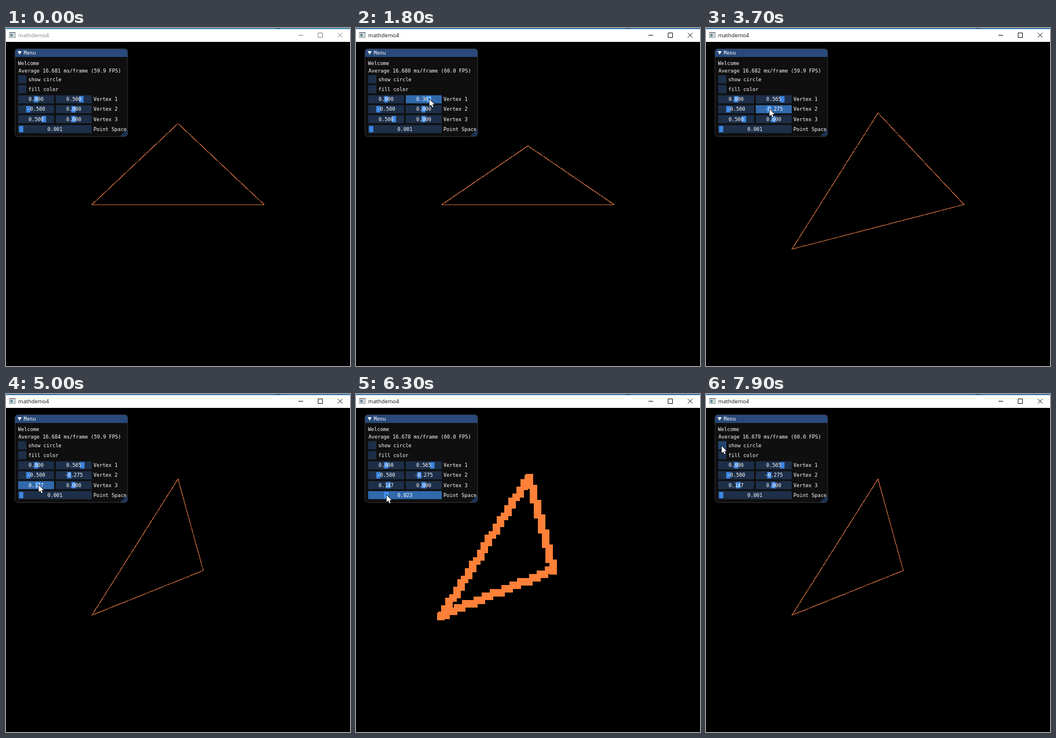
An HTML page with a canvas for the animation above (8 s loop, 594 by 584 pixels).

```html
<!DOCTYPE html>
<html lang="en">
<head>
<meta charset="utf-8">
<title>Triangle editor</title>
<style>
html, body { margin: 0; width: 100%; height: 100%; overflow: hidden; background: #000; }
canvas { display: block; }
</style>
</head>
<body>
<canvas id="stage" width="594" height="584"></canvas>
<script>
const ctx = document.getElementById('stage').getContext('2d');
const MONO = '8.67px "DejaVu Sans Mono", monospace';
const LOOP = 8000, STEP = 100, ROW = 17.15;

// The pointer rests on each stop and glides between them
const stops = [
  { from: 200, to: 200, spot: [481, 499] },
  { from: 1000, to: 2800, slider: 1 },
  { from: 3100, to: 4000, slider: 3 },
  { from: 4500, to: 5200, slider: 4 },
  { from: 5500, to: 7350, slider: 6 },
  { from: 7700, to: LOOP, spot: [27, 90] }
];

const progress = (t, from, to) => Math.min(1, Math.max(0, (t - from) / (to - from)));
const smooth = u => u * u * (3 - 2 * u);
const mix = (a, b, u) => a + (b - a) * u;

// Vertex positions (-1 to 1) as the sliders are dragged
function vertices(t) {
  const u = progress(t, 1100, 2600);
  return [
    [0, mix(.5, .565, u) - .169 * Math.sin(Math.PI * u)],
    [-.5, -.275 * progress(t, 3100, 3700)],
    [mix(.5, .147, progress(t, 4600, 5000)), 0]
  ];
}

function pointSpace(t) {
  const u = progress(t, 5500, 7180);
  return .001 + .029 * Math.sin(Math.PI * u ** 1.47) ** 2;
}

function frameTime(t) {
  const s = t / 1000;
  return 16.681 + .0008 * s * Math.sin(1.3 * (s - 3.3));
}

function layoutSliders(verts, space) {
  const list = verts.flatMap((vert, row) => vert.map((value, col) => ({
    x: 21 + 65 * col, y: 123.2 + ROW * row, w: 62, value, grab: 52 + 64.6 * col + 27 * value
  })));
  list.push({ x: 21, y: 174.7, w: 127, value: space, grab: 25 + space * 1190 });
  return list;
}

function locatePointer(t, sliders) {
  const place = stop => stop.spot || [sliders[stop.slider].grab + .5, sliders[stop.slider].y];
  const next = stops.find(stop => t < stop.to);
  const prev = stops[stops.indexOf(next) - 1] || next;
  const u = prev === next ? 1 : smooth(progress(t, prev.to, next.from));
  const [ax, ay] = place(prev), [bx, by] = place(next);
  return { x: mix(ax, bx, u), y: mix(ay, by, u), held: t >= next.from ? sliders[next.slider] : undefined };
}

function rect(x, y, w, h, color) {
  ctx.fillStyle = color;
  ctx.fillRect(x, y, w, h);
}

function text(str, x, y, color = '#fff', font = MONO, align = 'left') {
  ctx.font = font;
  ctx.textAlign = align;
  ctx.fillStyle = color;
  ctx.fillText(str, x, y);
}

function polygon(points) {
  ctx.beginPath();
  points.forEach(([x, y]) => ctx.lineTo(x, y));
  ctx.closePath();
}

// Bresenham steps of one point spacing, counted from the first vertex
function edge([ax, ay], [bx, by], space) {
  const size = Math.max(1, Math.round(space * 580));
  ctx.fillStyle = size > 1 ? '#ff8038' : '#c86a3c';
  const dx = Math.round(Math.abs(bx - ax) / space), dy = Math.round(Math.abs(by - ay) / space);
  const sx = Math.sign(bx - ax), sy = Math.sign(by - ay);
  let x = 0, y = 0, err = dx - dy;
  for (;;) {
    const px = 297 + (ax + sx * x * space) * 297;
    const py = 305 - (ay + sy * y * space) * 280;
    ctx.fillRect(Math.round(px - size / 2), Math.round(py - size / 2), size, size);
    if (x === dx && y === dy) return;
    const twice = 2 * err;
    if (twice > -dy) { err -= dy; x++; }
    if (twice < dx) { err += dx; y++; }
  }
}

function titleBar(active) {
  const ink = active ? '#111' : '#858585';
  rect(0, 0, 594, 24, '#fff');
  rect(0, 0, 594, 2, active ? '#3c79ae' : '#408cae');
  rect(466, 0, 8, 1, '#234668');
  rect(5.5, 7, 11, 10, '#8a8f94');
  rect(6.5, 9, 9, 7, '#f2f4f5');
  rect(7.5, 10, 4, 5, '#5d8792');
  rect(12.5, 10, 2, 5, '#c4c9cc');
  text('mathdemo4', 21, 16, ink, '9.3px "Open Sans", "Noto Sans", sans-serif');
  ctx.strokeStyle = ink;
  ctx.lineWidth = 1;
  ctx.beginPath();
  ctx.moveTo(505, 12.5); ctx.lineTo(513, 12.5);
  ctx.rect(539, 8.5, 7.5, 8);
  ctx.moveTo(573, 8.5); ctx.lineTo(581, 16.5);
  ctx.moveTo(581, 8.5); ctx.lineTo(573, 16.5);
  ctx.stroke();
}

function field(x, y, w, h, held, mouse) {
  const over = mouse.x >= x && mouse.x < x + w && mouse.y >= y && mouse.y < y + h;
  rect(x, y, w, h, held ? '#3169ac' : over && !mouse.held ? '#23456d' : '#1d2f49');
}

function drawSlider(slider, mouse) {
  const { x, y, w, value, grab } = slider;
  const held = mouse.held === slider;
  field(x, y - 7, w, 14, held, mouse);
  rect(grab - 3.7, y - 5.5, 7.4, 11, held ? '#4296fa' : '#3d85e0');
  text(value.toFixed(3), x + w / 2, y + 3, '#fff', MONO, 'center');
}

function panel(t, sliders, mouse) {
  ctx.beginPath();
  ctx.roundRect(15.5, 36, 194.5, 151.5, 5);
  ctx.save();
  ctx.clip();
  rect(15, 35, 196, 153, '#0f0f0f');
  rect(15, 35, 196, 15, '#294a7a');
  ctx.fillStyle = '#1b3354';
  polygon([[210, 174], [210, 188], [196, 188]]);
  ctx.fill();
  ctx.restore();
  ctx.strokeStyle = '#3e3e47';
  ctx.lineWidth = .8;
  ctx.beginPath();
  ctx.roundRect(15.5, 36, 194.5, 151.5, 5);
  ctx.stroke();

  ctx.fillStyle = '#fff';
  polygon([[20, 40], [27, 40], [23.5, 46]]);
  ctx.fill();
  text('Menu', 30.5, 46);
  const ms = frameTime(t);
  text('Welcome', 20.8, 64);
  text(`Average ${ms.toFixed(3)} ms/frame (${(1000 / ms).toFixed(1)} FPS)`, 21.5, 77);
  ['show circle', 'fill color'].forEach((label, i) => {
    const y = 81.5 + i * ROW;
    field(21, y, 14.2, 14.2, false, mouse);
    text(label, 38.5, y + 10.3);
  });
  sliders.forEach(slider => drawSlider(slider, mouse));
  ctx.save();
  ctx.beginPath();
  ctx.rect(15, 36, 192.7, 152);
  ctx.clip();
  ['Vertex 1', 'Vertex 2', 'Vertex 3', 'Point Space'].forEach((label, i) =>
    text(label, 151, 126.2 + i * ROW));
  ctx.restore();
}

function pointer({ x, y }) {
  ctx.save();
  ctx.translate(x, y);
  polygon([[0, 0], [0, 12], [2.8, 9.4], [4.8, 14], [6.8, 13.1], [4.9, 8.7], [8.6, 8.5]]);
  ctx.strokeStyle = '#000';
  ctx.lineWidth = 1.4;
  ctx.stroke();
  ctx.fillStyle = '#fff';
  ctx.fill();
  ctx.restore();
}

function draw(time) {
  const t = Math.floor(time % LOOP / STEP) * STEP;
  const verts = vertices(t), space = pointSpace(t);
  const sliders = layoutSliders(verts, space);
  const mouse = locatePointer(t, sliders);

  rect(0, 0, 594, 584, '#000');
  verts.forEach((vert, i) => edge(vert, verts[(i + 1) % 3], space));
  titleBar(t >= stops[1].from);
  panel(t, sliders, mouse);
  if (t >= stops[0].from) pointer(mouse);
}

let start;
function tick(now) {
  start ??= now;
  draw(now - start);
  requestAnimationFrame(tick);
}
requestAnimationFrame(tick);
</script>
</body>
</html>
```
